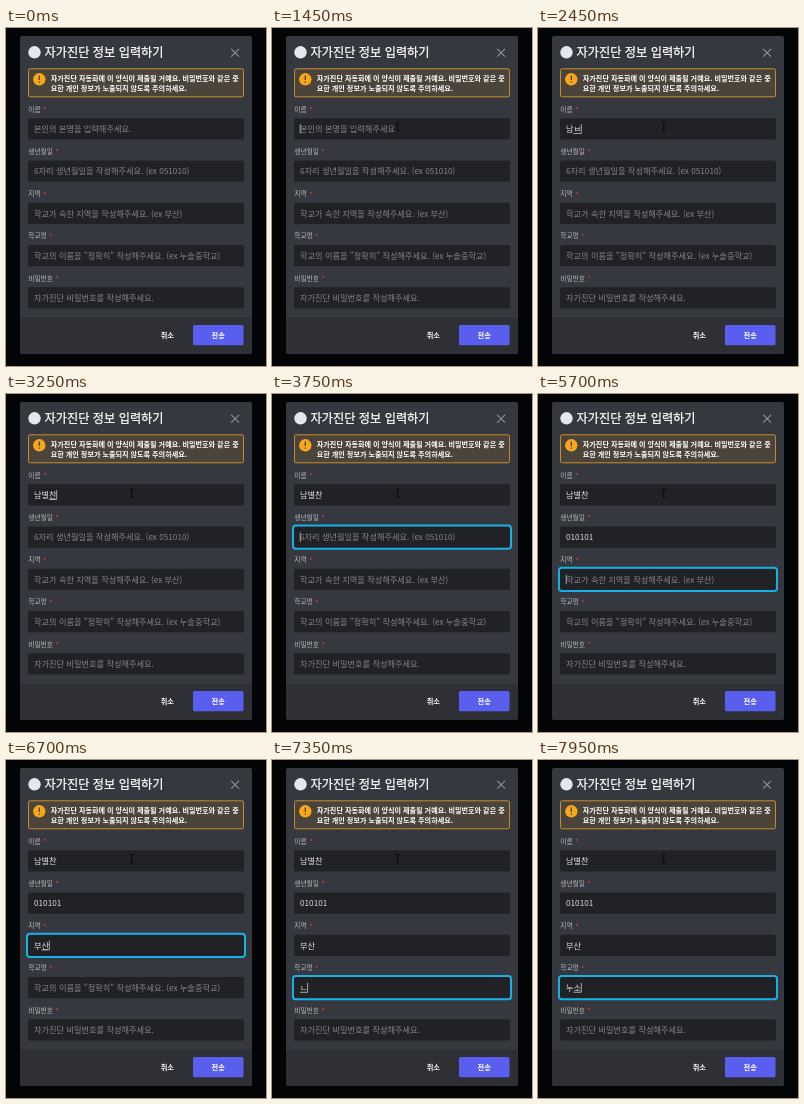
Recreate the animation shown at these times as an HTML page. Size 260x338 px, loop 8000 ms.

```html
<!DOCTYPE html>
<html lang="ko">
<head>
<meta charset="utf-8">
<style>
html, body { margin: 0; width: 100%; height: 100%; overflow: hidden; background: #030405; }
svg { display: block; width: 260px; height: 338px; }
text { font-family: "Noto Sans CJK KR", "Noto Sans CJK", "Noto Sans CJK JP", sans-serif; white-space: pre; }
.title { font-size: 12.2px; font-weight: 500; fill: #fff; stroke: #fff; stroke-width: .25px; }
.note { font-size: 7.1px; font-weight: 700; fill: #fff; }
.label { font-size: 6.7px; fill: #b9bbbe; }
.star { fill: #ed4245; }
.value { font-size: 8.2px; fill: #dcddde; }
.value.empty { fill: #82858a; }
.action { font-size: 7.2px; font-weight: 700; fill: #fff; text-anchor: middle; }
</style>
</head>
<body>
<svg viewBox="0 0 260 338">
  <rect x="14" y="8" width="232" height="318" rx="2" fill="#36383f"/>
  <path d="M14 289.5H246V324a2 2 0 0 1-2 2H16a2 2 0 0 1-2-2Z" fill="#2f3036"/>
  <circle cx="28.5" cy="24.3" r="6.2" fill="#e4e7ec"/>
  <text class="title" x="38.6" y="28.7">자가진단 정보 입력하기</text>
  <path d="M225.2 20.9l7.8 7.8m0-7.8l-7.8 7.8" stroke="#909296" stroke-width="1.1"/>
  <rect x="22.5" y="40.8" width="215" height="28" rx="1.6" fill="#4a443b" stroke="#d8952a" stroke-width=".9"/>
  <circle cx="33.3" cy="51.3" r="6.2" fill="#faa61a"/>
  <path d="M33.3 47.6v4.4m0 1.5v1.3" stroke="#4a443b" stroke-width="1.3"/>
  <text class="note" x="44.8" y="52.7">자가진단 자동화에 이 양식이 제출될 거예요. 비밀번호와 같은 중</text>
  <text class="note" x="44.8" y="62.7">요한 개인 정보가 노출되지 않도록 주의하세요.</text>
  <g id="form"></g>
  <rect x="187" y="297" width="50.5" height="20.3" rx="1.6" fill="#5a5eee"/>
  <text class="action" x="161.3" y="309.9">취소</text>
  <text class="action" x="212.2" y="309.9">전송</text>
  <rect id="ring" x="21" width="218" height="23.2" rx="2.8" fill="none" stroke="#17b0e6" stroke-width="2"/>
  <rect id="under" height=".7" fill="#dcddde"/>
  <rect id="caret" width=".7" height="9.4" fill="#dcddde"/>
  <path id="pointer" d="M124 94.6q1.7 0 1.7 1v6.6q0 1-1.7 1m3.4-8.6q-1.7 0-1.7 1m0 6.6q0 1 1.7 1" fill="none" stroke="#050506" stroke-width=".8"/>
</svg>
<script>
const LOOP = 8000, BLINK = 530, POINTER_AT = 1000;
const LEFT = 28, TOP = 90.3, STEP = 42.25, HEIGHT = 21.2;

const FIELDS = [
  ['이름', '본인의 본명을 입력해주세요.'],
  ['생년월일', '6자리 생년월일을 작성해주세요. (ex 051010)'],
  ['지역', '학교가 속한 지역을 작성해주세요. (ex 부산)'],
  ['학교명', '학교의 이름을 "정확히" 작성해주세요. (ex 누솔중학교)'],
  ['비밀번호', '자가진단 비밀번호를 작성해주세요.']
];

// time, field, text so far, last syllable still being composed
const KEYS = [
  [1400, 0, '', 0],
  [1900, 0, 'ㄴ', 1], [2050, 0, '나', 1], [2200, 0, '남', 1],
  [2350, 0, '남ㅂ', 1], [2500, 0, '남벼', 1], [2650, 0, '남별', 1],
  [2850, 0, '남별ㅊ', 1], [3050, 0, '남별차', 1], [3250, 0, '남별찬', 1],
  [3550, 1, '', 0],
  [4550, 1, '0', 0], [4700, 1, '01', 0], [4900, 1, '010', 0],
  [5050, 1, '0101', 0], [5250, 1, '01010', 0], [5400, 1, '010101', 0],
  [5700, 2, '', 0],
  [6000, 2, 'ㅂ', 1], [6150, 2, '부', 1], [6450, 2, '붓', 1],
  [6550, 2, '부사', 1], [6700, 2, '부산', 1],
  [6950, 3, '', 0],
  [7350, 3, 'ㄴ', 1], [7500, 3, '누', 1], [7750, 3, '눗', 1], [7950, 3, '누소', 1]
];

const byId = id => document.getElementById(id);
const form = byId('form'), ring = byId('ring'), under = byId('under');
const caret = byId('caret'), pointer = byId('pointer');

const rowY = i => TOP + STEP * i;

function place(el, attrs) {
  for (const k in attrs) el.setAttribute(k, attrs[k]);
}

function add(tag, attrs, content = '') {
  const el = document.createElementNS('http://www.w3.org/2000/svg', tag);
  place(el, attrs);
  el.textContent = content;
  form.append(el);
  return el;
}

function show(el, on) {
  el.style.visibility = on ? 'visible' : 'hidden';
}

const values = FIELDS.map(([name, hint], i) => {
  const y = rowY(i);
  const label = add('text', { class: 'label', x: 22.3, y: y - 6.6 }, name);
  add('text', { class: 'label star', x: 22.3 + label.getComputedTextLength() + 2.6, y: y - 6.2 }, '*');
  add('rect', { x: 22, y, width: 216, height: HEIGHT, rx: 1.6, fill: '#202225' });
  return add('text', { class: 'value empty', x: LEFT, y: y + 13.8 }, hint);
});

function setValue(i, text) {
  const el = values[i], next = text || FIELDS[i][1];
  if (el.textContent !== next) el.textContent = next;
  el.classList.toggle('empty', !text);
}

function draw(t) {
  const typed = FIELDS.map(() => '');
  let key = null;
  for (const k of KEYS) {
    if (k[0] > t) break;
    typed[k[1]] = k[2];
    key = k;
  }
  typed.forEach((text, i) => setValue(i, text));
  show(pointer, t >= POINTER_AT);
  show(ring, key && key[1] > 0);
  show(under, key && key[3]);
  show(caret, key && (t - key[0]) % (2 * BLINK) < BLINK);
  if (!key) return;

  const [, field, text, composing] = key, y = rowY(field), el = values[field];
  const end = text ? el.getComputedTextLength() : 0;
  place(ring, { y: y - 1 });
  place(caret, { x: LEFT + end - .2, y: y + 5.8 });
  if (composing) {
    const start = text.length > 1 ? el.getSubStringLength(0, text.length - 1) : 0;
    place(under, { x: LEFT + start, y: y + 14.8, width: end - start });
  }
}

const begin = performance.now();
function tick() {
  draw((performance.now() - begin) % LOOP);
  requestAnimationFrame(tick);
}
tick();
</script>
</body>
</html>
```
